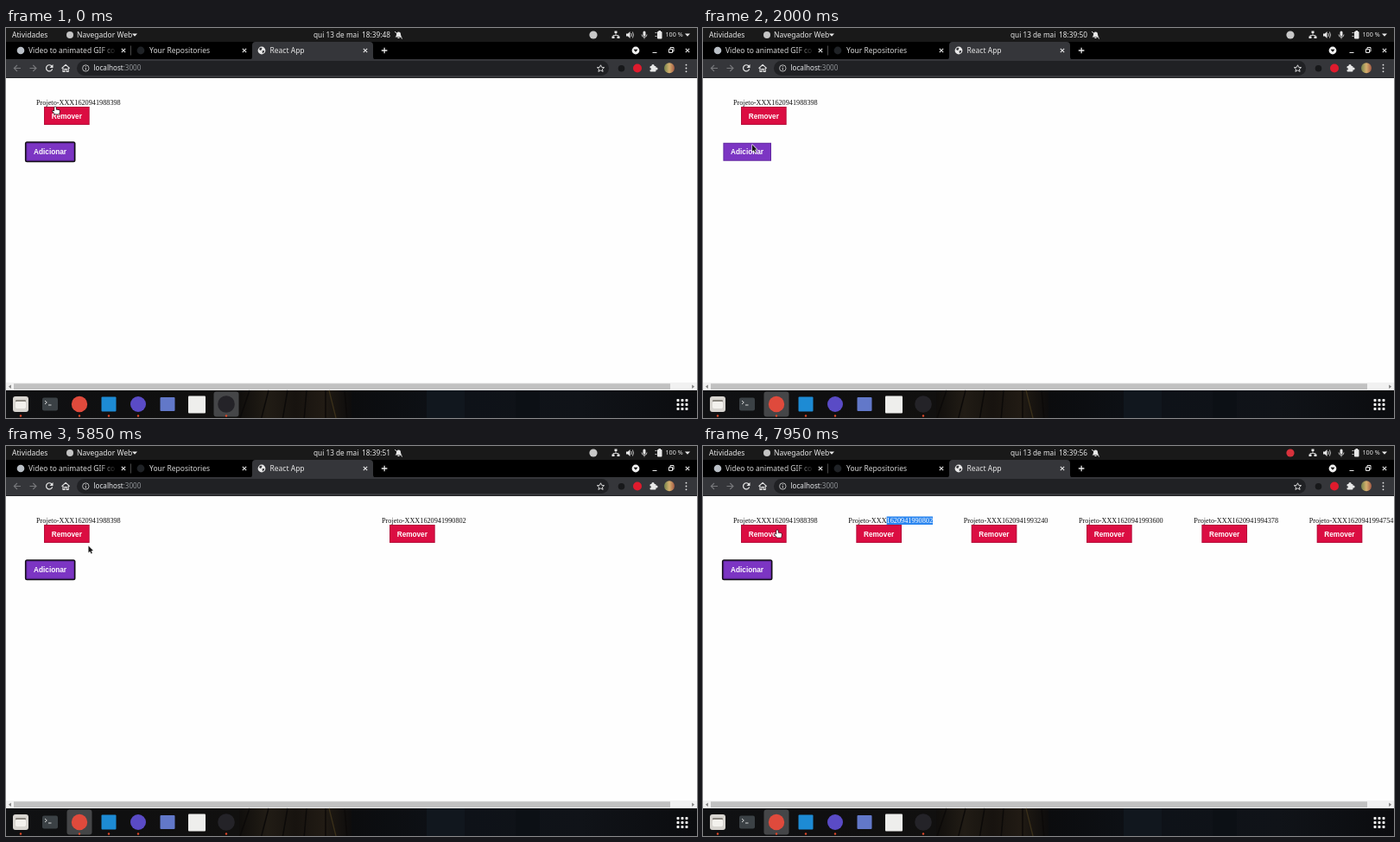
An HTML page with a canvas for the animation above (8000 ms loop, 800x451 px).

```html
<!DOCTYPE html>
<html lang="pt-BR">
<head>
<meta charset="utf-8">
<title>React App</title>
<style>
html, body { margin: 0; width: 100%; height: 100%; overflow: hidden; background: #fff; }
canvas { display: block; }
</style>
</head>
<body>
<canvas id="stage" width="800" height="451"></canvas>
<script>
const ctx = document.getElementById('stage').getContext('2d');
const LOOP = 8000;
const UI = '"Noto Sans", sans-serif';
const SERIF = '"Liberation Serif", serif';
const BOLD = '"Liberation Sans", sans-serif';
const LIGHT = '#e8e8e8';

const ids = ['1620941988398', '1620941990802', '1620941993240',
  '1620941993600', '1620941994378', '1620941994754'];

const counts = [[0, 1], [2400, 2], [5900, 4], [6000, 5], [6850, 6]];
const seconds = [[0, 48], [600, 49], [1600, 50], [2600, 51], [5900, 54], [6850, 55], [7600, 56]];
const focus = [[0, true], [1000, false], [2400, true]];
const pointerPath = [[0, 57, 91], [300, 60, 94], [1000, 75, 81], [1700, 74, 84],
  [2000, 57, 135], [2150, 57, 141], [2600, 57, 141], [3050, 95.5, 115.5],
  [5899, 95.5, 115.5], [5900, 66, 144], [6850, 66, 144], [7200, 74, 130],
  [7700, 86, 98], [8000, 86, 97]];

const at = (steps, t) => steps.filter(s => s[0] <= t).pop()[1];

function pointerAt(t) {
  t = Math.max(0, t);
  const i = Math.max(1, pointerPath.findIndex(p => p[0] > t));
  const [t0, x0, y0] = pointerPath[i - 1], [t1, x1, y1] = pointerPath[i];
  const k = (t - t0) / (t1 - t0), e = k * k * (3 - 2 * k);
  return [x0 + (x1 - x0) * e, y0 + (y1 - y0) * e];
}

function rect(x, y, w, h, fill, radius = 0) {
  ctx.fillStyle = fill;
  ctx.beginPath();
  ctx.roundRect(x, y, w, h, radius);
  ctx.fill();
}

function disc(x, y, r, fill) {
  ctx.fillStyle = fill;
  ctx.beginPath();
  ctx.arc(x, y, r, 0, 7);
  ctx.fill();
}

function ring(x, y, r, color, width = 1) {
  ctx.strokeStyle = color;
  ctx.lineWidth = width;
  ctx.beginPath();
  ctx.arc(x, y, r, 0, 7);
  ctx.stroke();
}

function line(path, color = LIGHT, width = 1.1) {
  ctx.strokeStyle = color;
  ctx.lineWidth = width;
  ctx.stroke(new Path2D(path));
}

function shape(path, fill) {
  ctx.fillStyle = fill;
  ctx.fill(new Path2D(path));
}

function text(str, x, y, size = 8.5, color = LIGHT, family = UI, weight = '') {
  ctx.font = `${weight} ${size}px ${family}`;
  ctx.fillStyle = color;
  ctx.fillText(str, x, y);
}

function gradient(x0, x1, ...colors) {
  const g = ctx.createLinearGradient(x0, 0, x1, 0);
  colors.forEach((c, i) => g.addColorStop(i / (colors.length - 1), c));
  return g;
}

const cross = (x, y, r = 2.2) =>
  line(`M${x - r} ${y - r}l${2 * r} ${2 * r}M${x + r} ${y - r}l${-2 * r} ${2 * r}`);
const caret = (x, y) => shape(`M${x - 3} ${y - 1.5}h6l-3 3.2z`, LIGHT);

function systemBar(t) {
  rect(0, 0, 800, 16, '#191919');
  text('Atividades', 7, 11);
  disc(74, 8, 4, '#c4c4c4');
  text('Navegador Web', 82, 11);
  caret(149, 8);
  text('qui 13 de mai', 356, 10.6, 8.25);
  text('18:39:' + at(seconds, t), 412, 10.6, 8.3);
  shape('M450.5 10.5q1.5-1 1.5-3q0-3 2.5-3t2.5 3q0 2 1.5 3zM453.5 11h2v1h-2z', LIGHT);
  line('M450 4l9 8.5', LIGHT, 0.9);

  disc(680, 8, 4.6, t < 5900 ? '#c8c8c8' : '#d8323c');
  line('M706 6v2.5M703 11v-2.5h6v2.5', LIGHT, 0.8);
  [[704.5, 3.5], [701.5, 9.5], [707.5, 9.5]].forEach(([x, y]) => rect(x, y, 3, 2.5, LIGHT));
  shape('M718 6.5h2l2.5-2.5v8l-2.5-2.5h-2z', LIGHT);
  line('M723.8 6q1.2 2 0 4M725.4 4.5q2.2 3.5 0 7', LIGHT, 0.8);
  rect(737.5, 3.5, 3, 6, LIGHT, 1.5);
  line('M736 7.5q0 3 3 3t3-3M739 10.5v2', LIGHT, 0.8);
  rect(754, 4, 5.5, 8.5, LIGHT, 1);
  rect(755.5, 3, 2.5, 1, LIGHT);
  line('M751.5 5.5h2M751.5 9.5h2', LIGHT, 0.8);
  text('100 %', 763.5, 10.3, 7.2);
  caret(789, 8);
}

function tabs() {
  rect(0, 16, 800, 21, '#000');
  shape('M281 37q4 0 4-4v-13q0-4 4-4h132q4 0 4 4v13q0 4 4 4z', '#35363a');
  disc(17, 26, 4.3, '#b9bfc6');
  text('Video to animated GIF co', 26, 29, 8.5, gradient(108, 129, '#d8d8d8', '#000'));
  cross(136, 26);
  rect(144, 20.5, 1, 11, '#4a4a4a');
  disc(156, 26, 4.4, '#1f2226');
  text('Your Repositories', 166, 29, 8.5, '#d4d4d4');
  cross(276, 26);
  disc(296, 26, 4.4, LIGHT);
  shape('M293 24l2-1.5 1.5 1-1 2-1.5.5zM296.5 26.5l2.5-.5v1.5l-2 2z', '#35363a');
  text('React App', 305.5, 29);
  cross(416, 26);
  line('M434.8 26h6.6M438.1 22.7v6.6', LIGHT, 1.3);

  disc(729, 26, 4.4, '#f0f0f0');
  shape('M726.6 24.8h4.8l-2.4 3z', '#000');
  line('M748.5 28.5h5M767.5 24.5h4v4h-4zM769 24v-1.5h4v4.5h-1.5', LIGHT, 1);
  cross(789, 26);
}

function toolbar() {
  rect(0, 36, 800, 22, '#35363a');
  rect(0, 57, 800, 1, '#242528');
  rect(82, 38, 616, 17, '#202124', 8.5);
  line('M17 46.5h-7.5M13 43l-3.7 3.5 3.7 3.5M27.5 46.5h7.5M31.3 43l3.7 3.5-3.7 3.5', '#77787b');
  line('M53.2 44.4a3.6 3.6 0 1 0 .4 3', LIGHT, 1.2);
  shape('M54.5 42v4h-4z', LIGHT);
  line('M64.5 46.7l4.6-4.3 4.6 4.3M66 46v4.5h2v-3h2.2v3h2v-4.5', LIGHT, 1.1);
  ring(92.3, 46.5, 3.7, '#c8c8c8', 0.9);
  rect(91.8, 44.3, 1, 1, '#c8c8c8');
  rect(91.8, 46, 1, 2.8, '#c8c8c8');
  text('localhost', 101.5, 49.4, 8.1, '#e8eaed');
  ctx.globalAlpha = 0.7;
  text(':3000', 101.5 + ctx.measureText('localhost').width, 49.4, 8.1, '#bfc3c8');
  ctx.globalAlpha = 1;
  line('M688.5 42.8l1.2 2.6 2.9.3-2.2 1.9.7 2.8-2.6-1.5-2.6 1.5.7-2.8-2.2-1.9 2.9-.3z', LIGHT, 0.9);
  disc(712.5, 46.8, 3.8, '#17181a');
  disc(731, 46.5, 5, '#df1b2d');
  rect(745.5, 44, 7, 6.5, LIGHT, 1);
  disc(749, 43.6, 1.6, LIGHT);
  disc(753, 47, 1.6, LIGHT);
  disc(745.8, 47.4, 1.1, '#35363a');
  disc(768, 46.3, 6, gradient(762, 774, '#73834b', '#d5b06e', '#a45a45'));
  [42.7, 46.5, 50.3].forEach(y => disc(787.5, y, 0.9, LIGHT));
}

function button(label, x, y, w, fill, edge, focused) {
  if (focused) rect(x - 1.5, y - 1.5, w + 3, 24, '#151019', 2.5);
  rect(x, y, w, 21, edge, focused ? 1 : 0);
  rect(x + 1, y + 1, w - 2, 19, fill);
  text(label, x + 8.7, y + 13.5, 8.22, '#fff', BOLD, 'bold');
}

function page(t) {
  rect(0, 58, 800, 352, '#fefefe');
  const count = at(counts, t);
  for (let i = 0; i < count; i++) {
    const x = 35 + i * 800 / count;
    const prefix = 'Projeto-XXX';
    text(prefix, x, 88.8, 8.22, '#111', SERIF);
    const idX = x + ctx.measureText(prefix).width;
    const selected = i === 1 && t >= 5900;
    if (selected) rect(idX, 81.5, ctx.measureText(ids[i]).width, 9.5, '#2b86f0');
    text(ids[i], idX, 88.8, 8.22, selected ? '#fff' : '#111', SERIF);
    button('Remover', x + 9, 91, 52.7, '#db0d42', '#b50d3a');
  }
  button('Adicionar', 23.4, 132.7, 55.6, '#7c35c3', '#6229a0', at(focus, t));

  rect(0, 410, 800, 9, '#f1f1f1');
  rect(9, 411.3, 760, 6.7, '#c1c1c1');
  shape('M5.8 412.5v4.4l-2.8-2.2z', '#7c7c7c');
  shape('M794.2 412.5v4.4l2.8-2.2z', '#7c7c7c');
}

function dock(t) {
  rect(0, 419, 800, 32, gradient(0, 800, '#101113', '#0f0f10', '#11100f', '#0b0c0e', '#0e1218', '#101318', '#0b0c0f'));
  rect(270, 419, 130, 32, gradient(270, 400, '#100e0c', '#211c15', '#17130f', '#211b14', '#0d0c0c'));
  for (let x = 282; x < 400; x += 22) line(`M${x} 419l${(x - 370) / 8} 32`, '#0c0a09', 1.5);
  line('M374 419l8 32', '#3b301a', 1.3);
  rect(487, 419, 44, 32, '#11171e');
  rect(590, 419, 28, 32, '#0c1015');

  const recorderActive = t < 400;
  rect(recorderActive ? 240.5 : 70.5, 420.5, 29, 29, '#454648', 3);

  rect(8, 426, 18, 18, '#d8d5d0', 3);
  rect(11, 430, 12, 10, '#8b8780', 1);
  rect(11, 432, 12, 8, '#f3f1ed', 1);
  rect(42, 427.5, 18, 15, '#3b4145', 2);
  line('M45 431l2.3 2-2.3 2M49 436h3.5', '#e5e5e5', 0.9);
  disc(85, 435, 9.2, '#df4a3c');
  rect(110.5, 426.5, 17, 17, '#1d8bd4', 1);
  disc(153, 435, 9, '#5a4bc6');
  rect(178.5, 427, 17, 16, '#6278c9', 1);
  rect(211, 425.5, 20, 20, '#eeeeec', 1);
  disc(255, 435, 9.8, '#242328');
  [17, 85, 119, 153, 255].forEach(x => disc(x, 448.5, 1.2, '#e0492a'));

  for (let i = 0; i < 9; i++)
    rect(776.5 + i % 3 * 5, 429 + Math.floor(i / 3) * 5, 3, 3, '#eee', 0.7);
}

function pointer(t) {
  const [x, y] = pointerAt(t);
  // The cursor image trails its position slightly.
  const [px, py] = pointerAt(t - 60);
  const inside = (left, right, top, bottom) => px >= left && px <= right && py >= top && py <= bottom;
  const hand = t >= 5900 && t < 6900 || inside(44, 97, 90.5, 112) || inside(23, 79, 133, 154);
  const outline = new Path2D(hand
    ? 'M-.9 5.5V.8Q0-.6.9.8V3.4L4.3 4Q5 4.2 5 5.2L4.5 8.6H-.2L-3 5.5Q-2.5 4-.9 5.5Z'
    : 'M0 0V7.8L1.8 6.2 3.1 9 4.3 8.4 3.1 5.7 5.4 5.5Z');
  ctx.save();
  ctx.translate(x, y);
  ctx.lineJoin = 'round';
  ctx.lineWidth = hand ? 1.3 : 1.2;
  ctx.strokeStyle = hand ? '#151515' : '#f4f4f4';
  ctx.stroke(outline);
  ctx.fillStyle = hand ? '#fff' : '#161616';
  ctx.fill(outline);
  ctx.restore();
}

function draw(now) {
  const t = now % LOOP;
  page(t);
  systemBar(t);
  tabs();
  toolbar();
  dock(t);
  pointer(t);
  requestAnimationFrame(draw);
}
requestAnimationFrame(draw);
</script>
</body>
</html>
```
